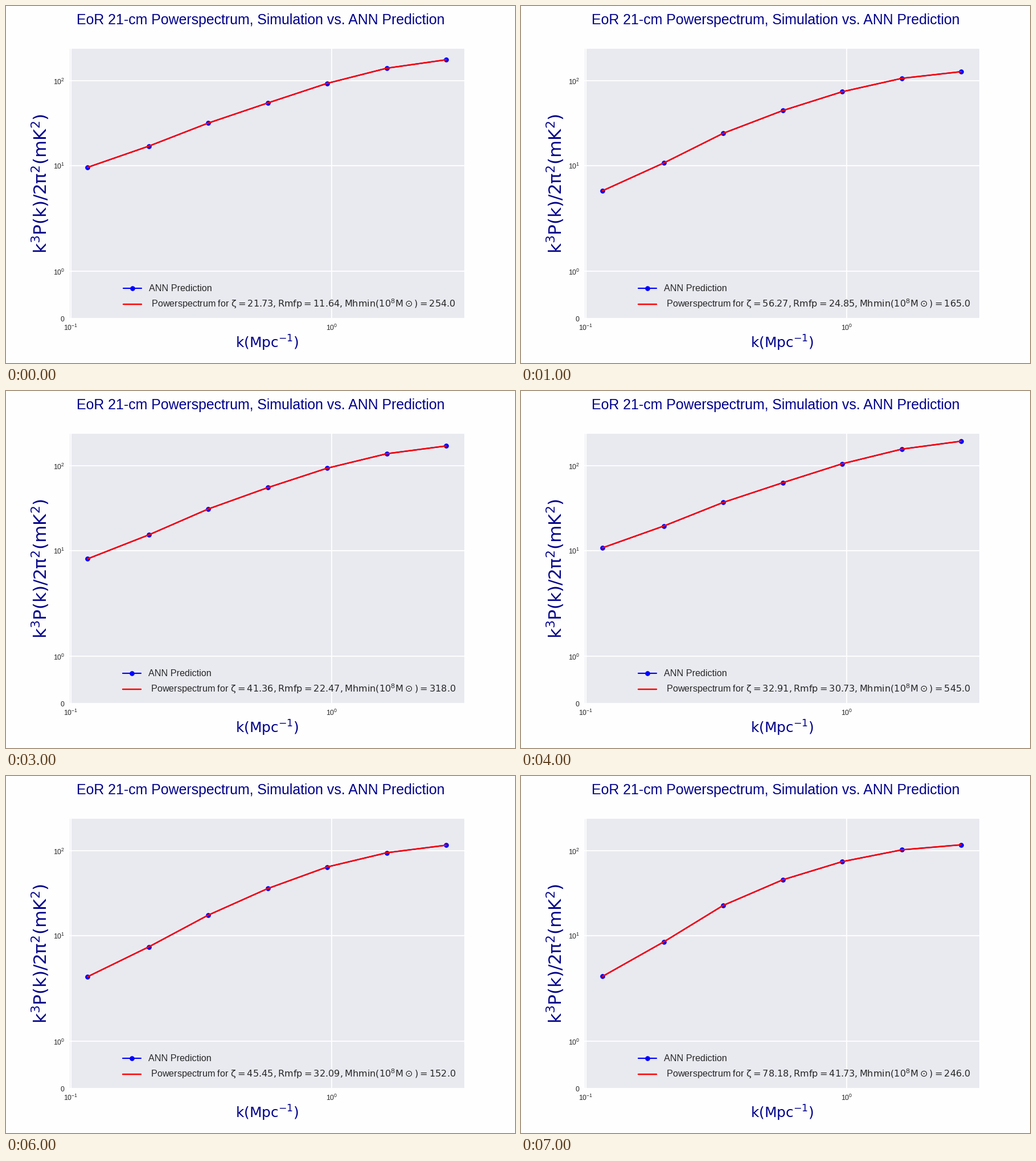
Animation of 894 by 626 pixels, one loop 8 s. Source, as a matplotlib script:

```python
import matplotlib.pyplot as plt
import numpy as np
from matplotlib.animation import FuncAnimation

DPI = 89.4
WIDTH, HEIGHT = 894, 626
NAVY = "darkblue"
DARK = "0.15"

plt.rcParams.update({
    "font.family": "Liberation Sans",
    "mathtext.default": "rm",
    "lines.solid_capstyle": "round",
    "text.color": DARK,
})

k = np.array([0.1158, 0.1992, 0.3361, 0.569, 0.9616, 1.63, 2.752])

# zeta, Rmfp, Mhmin, then log10 power at the start, knee and end
MODELS = [
    (21.73, 11.64, 254.0, 0.977, 1.501, 2.251),
    (56.27, 24.85, 165.0, 0.700, 1.380, 2.110),
    (86.09, 27.91, 375.0, 0.688, 1.446, 2.163),
    (41.36, 22.47, 318.0, 0.900, 1.490, 2.237),
    (32.91, 30.73, 545.0, 1.031, 1.568, 2.293),
    (75.18, 35.36, 71.0, 0.682, 1.111, 1.517),
    (45.45, 32.09, 152.0, 0.511, 1.240, 2.068),
    (78.18, 41.73, 246.0, 0.515, 1.355, 2.073),
]


def spectrum(start, knee, end):
    """Power at each k; a steeper rise to the knee gives a rounder top."""
    steep = knee - start - 0.5
    flat = max(1.2 - (end - start), 0)
    high = knee + (0.62 + 0.3 * steep) * (end - knee)
    logs = [
        start,
        (start + knee) / 2 - 0.01 + 0.28 * flat,
        knee,
        (knee + high) / 2 + 0.13 * steep,
        high,
        (high + end) / 2 + 0.04,
        end,
    ]
    return 10 ** np.array(logs)


def power_label(n):
    return rf"$\mathdefault{{10^{{{n}}}}}$"


def model_label(zeta, rmfp, mass):
    return (rf" Powerspectrum for $\zeta={zeta:.2f}, Rmfp={rmfp:.2f}, "
            rf"Mhmin(10^{{8}}M\odot)={mass:.1f}$")


# the small surplus keeps rounding from losing a pixel
fig = plt.figure(figsize=((WIDTH + 0.001) / DPI, (HEIGHT + 0.001) / DPI),
                 dpi=DPI, facecolor="#fefefe")
ax = fig.add_axes([0.125, 0.125, 0.775, 0.755], facecolor="#e9eaf0")
fig.suptitle("EoR 21-cm Powerspectrum, Simulation vs. ANN Prediction",
             fontsize=20, color=NAVY)

ax.set_xscale("log")
ax.set_yscale("symlog", linthresh=2)
ax.set_xlim(10 ** -1.0049, 10 ** 0.5085)
ax.set_ylim(0, 240)
ax.set_xticks([0.1, 1], [power_label(-1), power_label(0)])
ax.set_yticks([0, 1, 10, 100],
              [r"$\mathdefault{0}$"] + [power_label(n) for n in range(3)])
ax.minorticks_off()
ax.tick_params(length=0, pad=7, labelsize=10, labelcolor=DARK)
ax.grid(color="white", linewidth=1.5)
ax.set_axisbelow(True)
ax.spines[:].set_visible(False)
ax.set_xlabel("$k(Mpc^{-1})$", fontsize=20, color=NAVY, labelpad=2.5)
ax.set_ylabel(r"$k^{3}P(k)/2\pi^{2}(mK^{2})$", fontsize=25, color=NAVY,
              labelpad=2.5)

prediction, = ax.plot([], [], "o-", color="blue", linewidth=1.75,
                      markersize=7, markeredgewidth=0, label="ANN Prediction")
simulation, = ax.plot([], [], color="red", linewidth=2.0,
                      label=model_label(*MODELS[0][:3]))
legend = ax.legend(loc="lower right", fontsize=13, frameon=False)


def update(i):
    power = spectrum(*MODELS[i][3:])
    prediction.set_data(k, power)
    simulation.set_data(k, power)
    legend.get_texts()[1].set_text(model_label(*MODELS[i][:3]))
    return prediction, simulation, legend


anim = FuncAnimation(fig, update, frames=len(MODELS), interval=1000,
                     repeat=True, repeat_delay=0, blit=False)
plt.show()
```
